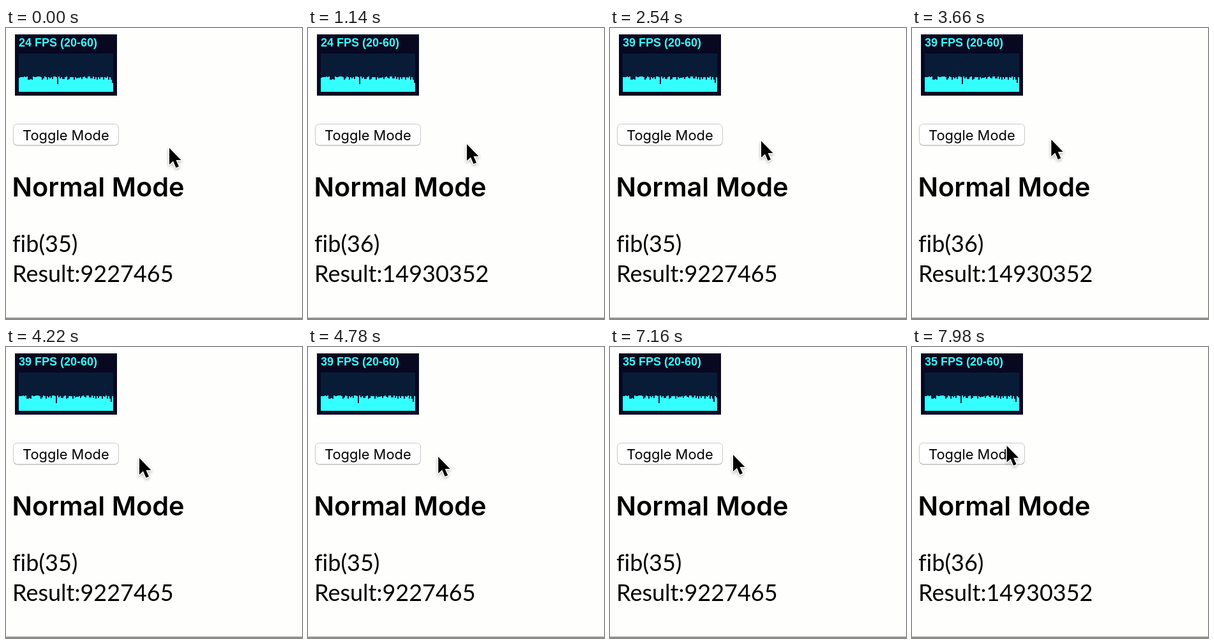
Write an HTML page that moves like this. It is 464 by 456 pixels and loops after 8000 ms.

```html
<!DOCTYPE html>
<html lang="en">
<head>
<meta charset="utf-8">
<title>Toggle Mode</title>
<style>
  html, body { margin: 0; width: 100%; height: 100%; overflow: hidden; background: #fefefd; }
  svg { display: block; }
  #fps { font: bold 18px "Liberation Sans", sans-serif; fill: #3ff; }
  #label { font: 21.9px Inter, sans-serif; }
  #heading { font: 600 41.5px Inter, sans-serif; }
  .body { font: 36px Lato, sans-serif; font-variant-ligatures: none; }
  #cursor { filter: drop-shadow(0 2px 2px #0004); }
</style>
</head>
<body>
<svg width="464" height="456" viewBox="0 0 464 456">
  <rect x="14" y="10" width="160" height="96" fill="#080820"/>
  <rect x="20" y="40" width="148" height="60" fill="#081c38"/>
  <path id="bars" fill="#3ff" shape-rendering="crispEdges"/>
  <text id="fps" x="20" y="29"></text>

  <rect x="11.5" y="151.5" width="165" height="33" rx="6" fill="#a8a8a8"/>
  <rect x="11.5" y="150.5" width="165" height="33" rx="6" fill="#fff" stroke="#c9c9c9"/>
  <text id="label" x="26" y="176">Toggle Mode</text>

  <text id="heading" x="9.5" y="264">Normal Mode</text>
  <text id="call" class="body" x="10" y="351"></text>
  <text id="result" class="body" x="10" y="398"></text>
  <rect y="454" width="464" height="1.5" fill="#666"/>

  <path id="cursor" d="M0 0V26L6 20.5L10.5 31L15 29L10.5 19H18.5Z"
        stroke="#fff" stroke-width="3" paint-order="stroke" stroke-linejoin="round"/>
</svg>
<script>
const LOOP = 8000;
const BAR_COUNT = 74;
const $ = id => document.getElementById(id);

// The recording shows three evenly sampled steps per 140 ms, held for 100, 20 and 20 ms.
function stepAt(t) {
  const beats = Math.floor((t - 20) / 140);
  const rest = t - 20 - beats * 140;
  return 1 + beats * 3 + (rest >= 100) + (rest >= 120);
}

// Step, then the position of the pointer's tip.
const pointerPath = [
  [0, 256, 188], [25, 249, 182], [55, 237, 177], [91, 209, 174],
  [121, 197, 169], [124, 193, 169], [154, 193, 169], [172, 146, 154]
];

function pointerAt(step) {
  const next = pointerPath.findIndex(key => key[0] > step);
  const [s0, x0, y0] = pointerPath[next - 1];
  const [s1, x1, y1] = pointerPath[next];
  const k = (step - s0) / (s1 - s0);
  return [x0 + (x1 - x0) * k, y0 + (y1 - y0) * k];
}

// fib(36) takes 28 steps to compute, fib(35) takes 17; the last result stays up meanwhile.
function fib(n) {
  let [a, b] = [0, 1];
  while (n-- > 0) [a, b] = [b, a + b];
  return a;
}
const shownInput = step => (step + 23) % 45 < 17 ? 36 : 35;

// A history of frame rates with one slow moment, followed by the rates shown.
const shownRates = [24, 39, 35];
const noise = i => Math.abs(Math.sin(i * 12.9898 + 4) * 43758.5453) % 1;
const history = Array.from({ length: BAR_COUNT - 1 }, (_, i) =>
  i === 30 ? 20 : Math.round(40 - 9 * noise(i) ** 2));
const rates = history.concat(shownRates);

function drawStats(step) {
  const shift = (step >= 39) + (step >= 112);
  $("fps").textContent = `${shownRates[shift]} FPS (20-60)`;
  $("bars").setAttribute("d", rates.slice(shift, shift + BAR_COUNT)
    .map((rate, i) => `M${20 + i * 2} 100v${-Math.round(rate * 0.6)}h2V100z`).join(""));
}

function draw() {
  const step = stepAt(performance.now() % LOOP);
  const n = shownInput(step);
  $("call").textContent = `fib(${n})`;
  $("result").textContent = `Result:${fib(n)}`;
  drawStats(step);
  $("cursor").setAttribute("transform", `translate(${pointerAt(step)})`);
  requestAnimationFrame(draw);
}
draw();
</script>
</body>
</html>
```
